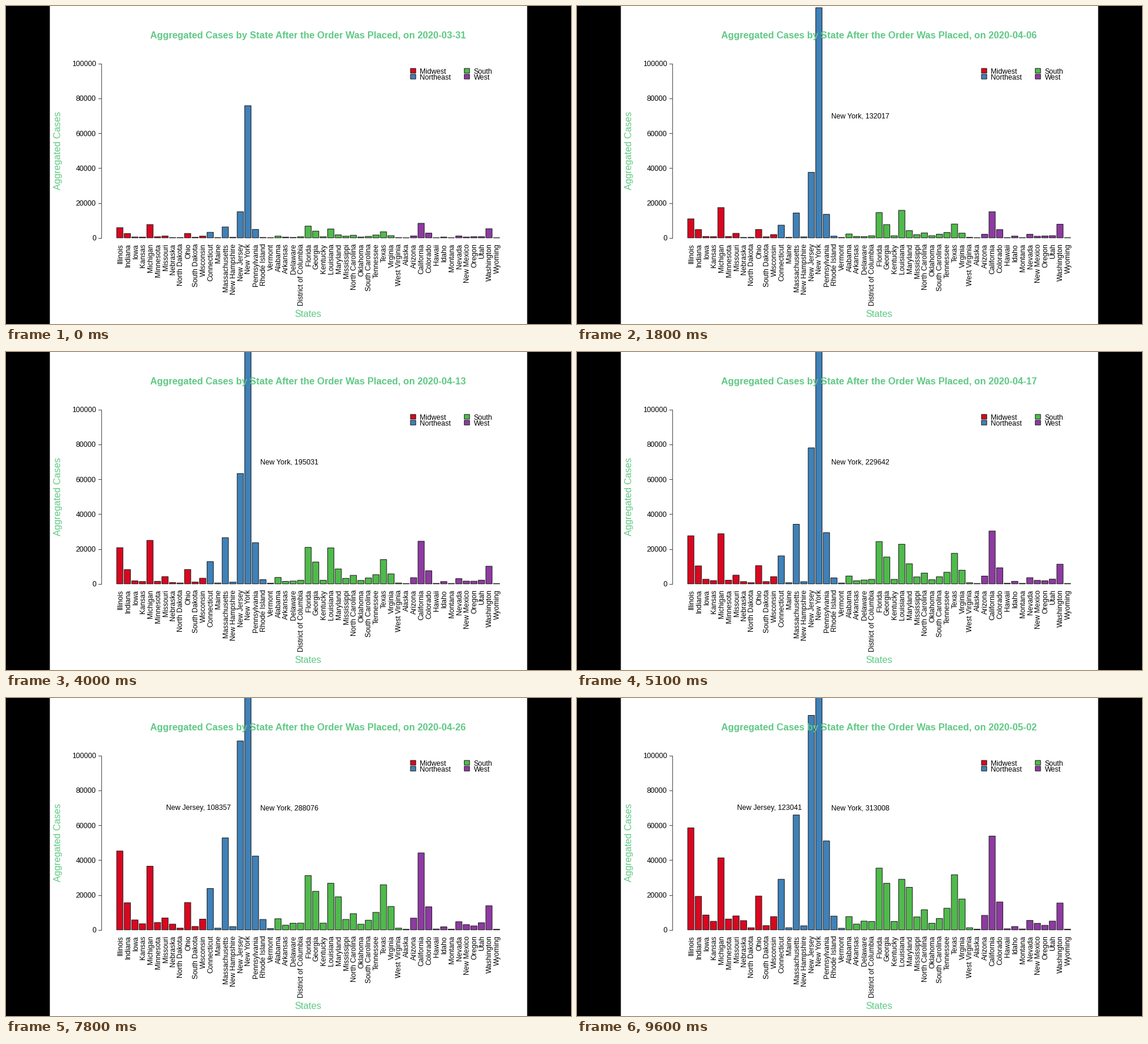
Write a matplotlib script that moves like this. It is 960x540 px and loops after 9.9 s.

```python
import numpy as np
import matplotlib.pyplot as plt
from matplotlib.animation import FuncAnimation
from matplotlib.patches import Rectangle

W, H, DPI = 960, 540, 100
DAYS, STEP = 33, 300
ZERO, UNIT = 393.7, 296 / 100000      # baseline y, pixels per case
FIRST, PITCH, BAR = 193.4, 12.8, 10.7
LIMIT = 100000                        # bars above this get a label

GREEN = "#60c985"
COLORS = {"Midwest": "#d9071f", "Northeast": "#3f81b8",
          "South": "#4fbb4b", "West": "#8e3aa2"}


def grow(end, bend=1.2, share=0.13):
    """Rise from a share of the end value (in thousands) along a power curve."""
    t = np.arange(DAYS) / (DAYS - 1)
    return 1000 * end * (share + (1 - share) * t ** bend)


def path(*counts):
    """Straight pieces between the counts on a few key days."""
    return np.interp(np.arange(DAYS), (0, 6, 13, 17, 21, 26, 32), counts)


REGIONS = {
    "Midwest": {
        "Illinois": grow(58.5, 1.4, 0.1),
        "Indiana": grow(19.2),
        "Iowa": grow(8.5, 2.1, 0.06),
        "Kansas": grow(4.9, 1.8, 0.09),
        "Michigan": grow(41.3, 0.74, 0.185),
        "Minnesota": grow(6.2, 2.1, 0.1),
        "Missouri": grow(8, 0.9),
        "Nebraska": grow(5.3, 2.4, 0.03),
        "North Dakota": grow(1.2),
        "Ohio": grow(19.4),
        "South Dakota": grow(2.4),
        "Wisconsin": grow(7.6),
    },
    "Northeast": {
        "Connecticut": grow(29, 1.1, 0.11),
        "Maine": grow(1.2),
        "Massachusetts": grow(65.9, 1.2, 0.095),
        "New Hampshire": grow(2.3),
        "New Jersey": path(15000, 37600, 63300, 78000, 91700, 108357, 123041),
        "New York": path(75832, 132017, 195031, 229642, 251720, 288076, 313008),
        "Pennsylvania": grow(51, 1, 0.095),
        "Rhode Island": grow(7.9, 1.4, 0.03),
        "Vermont": grow(0.9),
    },
    "South": {
        "Alabama": grow(7.6, 1),
        "Arkansas": grow(3.3),
        "Delaware": grow(5, 1.4, 0.05),
        "District of Columbia": grow(4.8),
        "Florida": grow(35.4, 0.78, 0.19),
        "Georgia": grow(26.7, 1.08, 0.145),
        "Kentucky": grow(4.8),
        "Louisiana": grow(29, 0.48, 0.175),
        "Maryland": grow(24.4, 1.33, 0.07),
        "Mississippi": grow(7.4),
        "North Carolina": grow(11.5),
        "Oklahoma": grow(3.8, 0.9),
        "South Carolina": grow(6.5, 0.9),
        "Tennessee": grow(12.4),
        "Texas": grow(31.6, 1.1, 0.11),
        "Virginia": grow(17.7, 1.45, 0.07),
        "West Virginia": grow(1.2),
    },
    "West": {
        "Alaska": grow(0.4),
        "Arizona": grow(8.3),
        "California": grow(53.8, 1.15, 0.155),
        "Colorado": grow(16, 1.13, 0.17),
        "Hawaii": grow(0.6),
        "Idaho": grow(1.9, 0.6, 0.25),
        "Montana": grow(0.5),
        "Nevada": grow(5.4, 0.9, 0.2),
        "New Mexico": grow(3.7),
        "Oregon": grow(2.6, 0.9, 0.25),
        "Utah": grow(5),
        "Washington": grow(15.4, 0.82, 0.34),
        "Wyoming": grow(0.4),
    },
}


def date(day):
    if day == 0:
        return "2020-03-31"
    return f"2020-{4 + (day - 1) // 30:02d}-{(day - 1) % 30 + 1:02d}"


fig = plt.figure(figsize=(W / DPI, H / DPI), dpi=DPI, facecolor="black")
ax = fig.add_axes([0, 0, 1, 1])
ax.set_xlim(0, W)
ax.set_ylim(H, 0)
ax.axis("off")


def px(n):
    return n * 72 / DPI


def text(x, y, s, size=12.1, color="black", **kw):
    return ax.text(x, y, s, fontsize=px(size), color=color,
                   family="Liberation Sans", va="baseline",
                   rotation_mode="anchor", **kw)


def box(x, y, w, h, color, edge="#1c1c1c"):
    return ax.add_patch(Rectangle((x, y), w, h, facecolor=color, snap=False,
                                  edgecolor=edge, linewidth=px(1)))


def line(xs, ys):
    ax.plot(xs, ys, color="#484848", linewidth=px(1), zorder=1)


box(74.5, 0, 811, H, "white", "none")

# Value axis
line([162, 162], [ZERO, ZERO - LIMIT * UNIT])
for value in range(0, LIMIT + 1, 20000):
    y = ZERO - value * UNIT
    line([157, 162], [y, y])
    text(153, y + 4.5, str(value), ha="right")

# Bars and state names
bars, cases = [], {}
for region, states in REGIONS.items():
    for name, counts in states.items():
        x = FIRST + PITCH * len(bars)
        cases[name] = counts
        bars.append(box(x - BAR / 2, ZERO, BAR, 0, COLORS[region]))
        text(x + 4.4, 403.5, name, ha="right", rotation=90)

# Legend
for i, (region, color) in enumerate(COLORS.items()):
    x, y = 687.2 + 91.5 * (i // 2), 106 + 10 * (i % 2)
    box(x, y, 9, 8, color)
    text(x + 16.1, y + 9, region)

title = text(513, 55.3, "", 16.1, GREEN, weight="bold", ha="center")
text(513, 528.5, "States", 16.1, GREEN, ha="center")
text(92.5, 245, "Aggregated Cases", 16.1, GREEN, ha="center", rotation=90)
notes = {"New Jersey": text(326.7, 189.6, "", ha="center"),
         "New York": text(481.2, 190.2, "", ha="center")}


def draw(day):
    for bar, counts in zip(bars, cases.values()):
        bar.set_height(-counts[day] * UNIT)
    for name, note in notes.items():
        count = round(cases[name][day])
        note.set_text(f"{name}, {count}" if count > LIMIT else "")
    title.set_text("Aggregated Cases by State After the Order Was Placed, on "
                   + date(day))
    return [*bars, *notes.values(), title]


anim = FuncAnimation(fig, draw, frames=DAYS, interval=STEP,
                     init_func=lambda: draw(0), repeat=True, repeat_delay=0)
plt.show()
```
